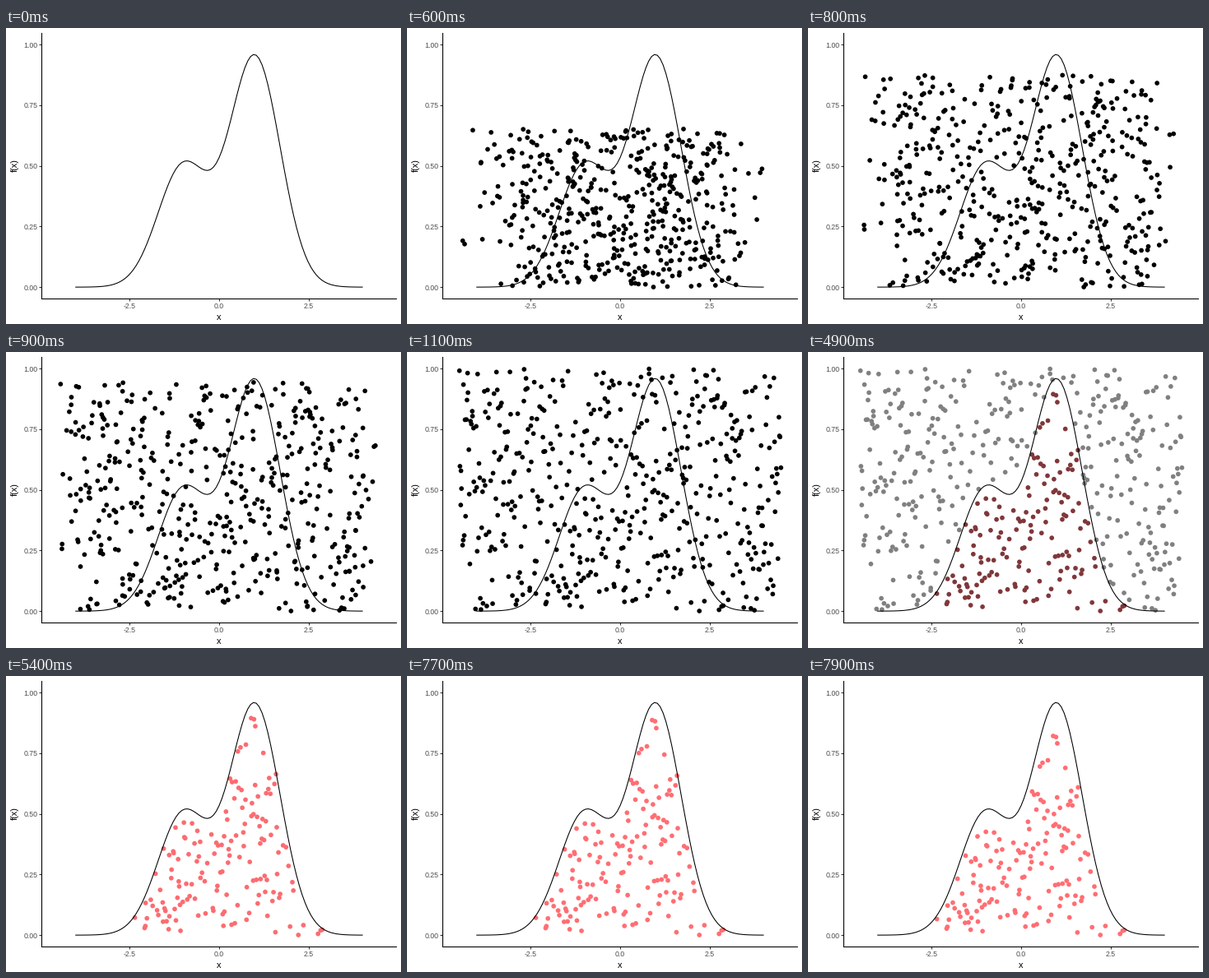
Write a matplotlib script that moves like this. It is 480 by 360 pixels and loops after 8000 ms.

```python
import numpy as np
import matplotlib.pyplot as plt
from matplotlib.animation import FuncAnimation

W, H, DPI = 480, 360, 100
PX = 72 / DPI            # points per pixel
STEP, FRAMES = 100, 80   # ms per frame, frames per loop
N = 500
LEFT, RIGHT, TOP, BOTTOM = 43.4, 474.4, 5.5, 329.4
RED, WHITE = np.array([255, 110, 115]) / 255, np.ones(3)

plt.rcParams["font.family"] = "Liberation Sans"


def density(x):
    return 0.5 * np.exp(-(x + 1) ** 2) + 0.95 * np.exp(-(x - 1) ** 2)


def ease(t):
    t = np.clip(t, 0, 1)
    return 2 * t * t if t < 0.5 else 1 - 2 * (1 - t) ** 2


def spread(rng, lo, hi):
    """Shuffled random values, one from each of N equal slices."""
    return lo + (hi - lo) * (rng.permutation(N) + rng.random(N)) / N


rng = np.random.default_rng(7)
x = spread(rng, -4.5, 4.5)
y = spread(rng, 0, 1)
start = spread(rng, -4.5, 4.5)
accepted = y < density(x)
final = np.where(accepted[:, None], RED, WHITE)

fig = plt.figure(figsize=(W / DPI, H / DPI), dpi=DPI, facecolor="white")
ax = fig.add_axes([LEFT / W, 1 - BOTTOM / H,
                   (RIGHT - LEFT) / W, (BOTTOM - TOP) / H])
ax.set_xlim(-4.95, 4.95)
ax.set_ylim(-0.0483, 1.05)
ax.spines[["top", "right"]].set_visible(False)
ax.spines[["left", "bottom"]].set_linewidth(1.07 * PX)
ax.set_xticks(np.arange(-2.5, 3, 2.5))
ax.set_yticks(np.arange(0, 1.1, 0.25))
ax.xaxis.set_major_formatter(lambda v, pos: f"{v:.1f}")
ax.yaxis.set_major_formatter(lambda v, pos: f"{v:.2f}")
ax.tick_params(length=2.75 * PX, width=1.07 * PX, pad=2.2 * PX,
               color="#333333", labelcolor="#4d4d4d", labelsize=8.8 * PX)
fig.text(258.9 / W, 1 - 355 / H, "x", size=11 * PX, ha="center", va="baseline")
fig.text(15.4 / W, 1 - 167 / H, "f(x)", size=11 * PX, rotation=90,
         ha="right", va="center")

curve = np.linspace(-4, 4, 101)
ax.plot(curve, density(curve), color="black", lw=1.07 * PX, zorder=3)
dots = ax.scatter(x, y, s=(5.7 * PX) ** 2, linewidths=0, color="black", zorder=2)


def update(i):
    ms = i * STEP
    rise = ease((ms + 100) / 1200)
    tint = ease((ms - 4300) / 1200)
    sink = ease((ms - 7600) / 1480)
    shown = (ms >= 500) & (accepted | (ms < 5400))
    dots.set_offsets(np.column_stack([start + (x - start) * rise,
                                      y * rise * (1 - sink)]))
    dots.set_facecolor(np.column_stack([final * tint, shown]))
    return dots,


anim = FuncAnimation(fig, update, frames=FRAMES, interval=STEP,
                     init_func=lambda: update(0), repeat=True, repeat_delay=0)
plt.show()
```
